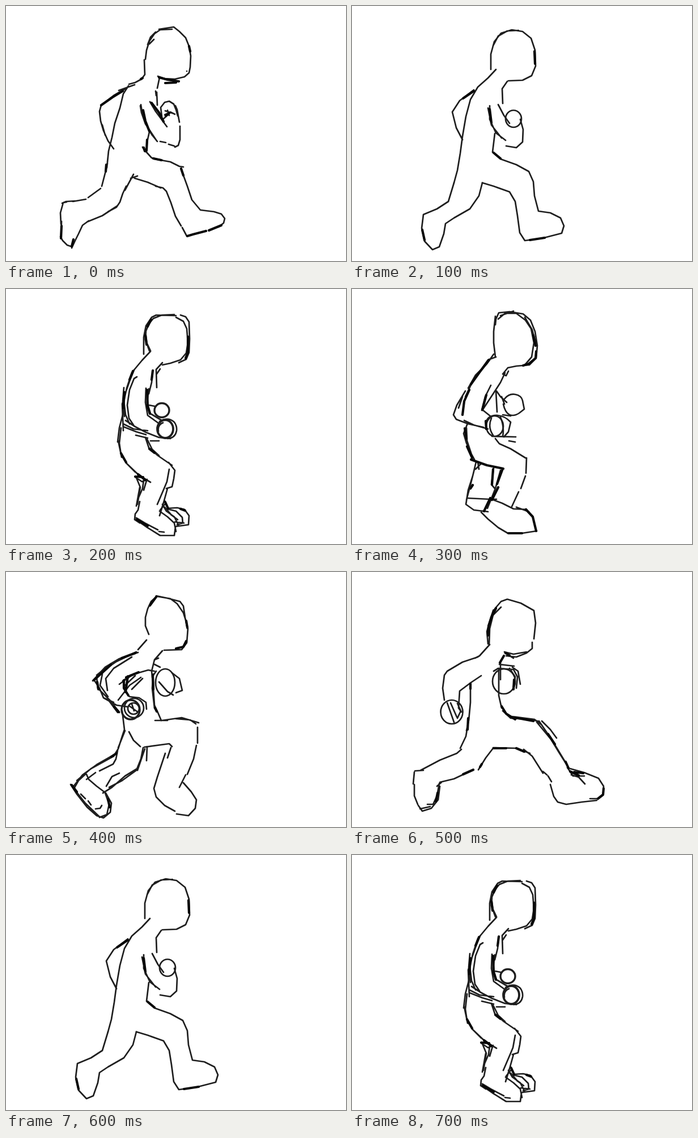
These frames come from a looping animation (600x450 px, 0.8 s). An HTML page:

```html
<!DOCTYPE html>
<html lang="en">
<head>
<meta charset="utf-8">
<title>Run cycle</title>
<style>
  html, body { margin: 0; width: 100%; height: 100%; overflow: hidden; background: #fff; }
  svg { display: block; width: 100%; height: 100%; }
  .pose {
    fill: none; stroke: #1e1e1e; stroke-width: 2.7;
    stroke-linecap: round; stroke-linejoin: round;
    filter: blur(0.6px);
    visibility: hidden;
    animation: once 800ms step-end infinite;
    animation-delay: calc((var(--i) - 8) * 100ms);
  }
  .both { animation-name: twice; }
  .bold { stroke: #080808; stroke-width: 4.2; }
  @keyframes once { 0% { visibility: visible; } 12.5%, 100% { visibility: hidden; } }
  /* poses shared by both steps return 500 ms later */
  @keyframes twice {
    0%, 62.5% { visibility: visible; }
    12.5%, 75%, 100% { visibility: hidden; }
  }
</style>
</head>
<body>
<svg viewBox="0 0 600 450">

  <!-- stride -->
  <g class="pose" style="--i:0">
    <path d="M244 95L245 121L239 129M246 94L248 78L253 62L262 49L272 42L293 41M250 68L255 55L264 46M253 67L261 59M270 41L296 37L306 45L317 56L323 71L326 88L325 108L323 118L315 125L298 129L280 128L268 124M319 115h.1M271 126L267 145M266 152L267 175M264 150L265 158"/>
    <path d="M241 128L228 135L217 138M227 139L199 149M214 144L190 158L168 175L165 186L167 203L172 220L180 238L190 252M170 210L175 228M216 141L207 155L201 180L192 207L187 232L181 256L178 285M179 278L176 291L169 318"/>
    <path d="M238 174L241 193L250 215L258 228L267 239M237 176L239 188L246 208L266 238M254 169L264 186L284 213M272 239L282 241M287 244L297 247M298 249L304 246L307 236L307 212M306 205L302 183L299 176M275 195L273 179L280 170L288 168L296 173L300 183L303 194M280 192L290 187L298 191M285 184L288 193M278 199L288 190M281 185L293 189"/>
    <path d="M253 222L249 240L248 258L257 268L276 272M241 249L246 257M262 270L290 275L306 283L313 284M312 296L320 318L328 342L343 360L367 363L380 367L386 375L384 383L375 390M319 406L311 391M309 388L299 371L291 347L283 327L277 321L264 318M273 321L250 311L227 304"/>
    <path d="M220 304L232 300M225 297L218 310L210 325M212 318L206 331L201 346L195 355L180 363M196 353L170 370L143 381M146 379L135 387L128 402L122 414L116 427M117 425L108 422L100 414L96 407M97 408L98 380M97 385L96 365L101 347L107 346M99 348L106 345L122 344M118 345L141 341M145 338L167 322"/>
    <path class="bold" d="M323 71L325 80M270 126L285 130L305 133M281 136L300 135M241 127L238 129M206 150L188 161L168 175M242 184L246 203L253 221M257 171L270 188L278 204M282 194L288 189M243 250L245 256M249 236L248 255M260 269L274 272M309 287L313 299M353 397L330 403L320 406M380 387L358 396M98 388L97 410M177 280L176 292M119 412L116 424"/>
  </g>

  <!-- down -->
  <g class="pose both" style="--i:1">
    <path d="M245 112L245 85L251 63L263 48L282 42L301 45L316 57L323 78L324 106L317 123L301 131L276 132M249 70L258 53L274 44L294 43M254 112L240 127L222 143M274 133L265 146L266 172M222 143L209 165L201 195L195 230L191 260L186 290L180 312M215 148L190 167L177 187L184 215L195 236"/>
    <path d="M243 176L243 200L254 224L271 237M240 180L246 210L264 233M258 174L268 193L278 207M272 247L290 250L301 240L302 218L297 200M252 225L248 258L262 270L290 280L312 292L320 310L322 335L329 362L350 365L368 374L374 388L370 401L335 410L305 414L296 400L292 370L288 345L278 328L250 318L230 312"/>
    <path d="M230 312L224 335L208 358L180 374L165 384L162 402L154 425L142 430L128 415L123 392L126 368L150 358L170 345L180 312"/>
    <ellipse cx="285" cy="199" rx="14" ry="15"/>
    <path class="bold" d="M322 80L323 102M215 150L196 163M243 182L246 206M250 259L262 269M340 409L314 413M124 395L128 413"/>
  </g>

  <!-- passing -->
  <g class="pose both" style="--i:2">
    <path d="M243 115L243 85L247 65L257 50L265 46L300 47M253 60L247 74L246 90L255 109M250 64L260 52L275 46L297 45M308 46L317 49L323 58L324 88L323 112L318 124L305 130M300 50L313 57L319 70L321 95L318 113L308 125L290 131L276 134M246 75L249 98L253 109M255 110L240 126L225 144M276 130L265 142L266 174M272 141L266 150M259 143L257 165L252 185"/>
    <path d="M226 143L219 160L212 180L205 203L207 250M222 148L213 175L208 198L211 222L218 238M231 155L226 158L218 178L214 205L217 228L225 240M208 174L206 198L209 225M247 175L246 200L250 223L268 236M252 176L249 200L255 220L275 232M253 205L263 207M207 238L225 247L250 250M211 232L228 243L247 253L270 262L290 264M229 258L250 263M207 243L230 252L247 257M255 268L270 268"/>
    <ellipse cx="275" cy="214" rx="13" ry="12.5" stroke-width="3.4"/>
    <ellipse cx="281" cy="247" rx="14" ry="16" stroke-width="3.8"/>
    <path d="M271 234Q286 225 297 235Q302 242 301 250Q299 263 285 264M269 251Q267 240 277 236"/>
    <path d="M206 222L200 245L197 270M203 245L200 272L203 292L213 308L228 323M198 268L204 297M213 308L235 329L255 341M246 262L252 280L268 294L284 305L293 311M249 265L258 283L270 294M287 306L298 320L296 335L293 349L283 352M285 352L278 377L271 400M288 318L284 340L279 352L273 366L267 380"/>
    <path d="M228 332L240 340L249 336M230 333L237 350L234 367M243 337L241 352L234 368L232 380M248 338L243 355M236 350L232 372L230 383M236 375L233 390L228 397L227 407L236 413M229 407L248 420L272 435L297 435L299 420M230 404L245 413L268 425M270 428L279 429M271 392L285 402L297 413L300 428"/>
    <path d="M280 374L286 387L302 386L315 389L323 400L322 416L300 419M276 380L283 392L297 402L305 418M284 388L300 392L311 403L312 413L302 416M280 385L292 399L303 407M298 411L314 413M281 379L272 390"/>
    <path class="bold" d="M256 54L250 66M246 82L248 98M321 84L321 112L317 122M259 144L257 160M224 145L218 160M209 182L207 210M249 178L250 208L254 220M231 407L250 418M228 331L242 332M203 290L212 306M233 327L246 337M253 282L262 289M281 376L286 387M308 388L316 391"/>
  </g>

  <!-- lift -->
  <g class="pose" style="--i:3">
    <path d="M253 63L254 53L259 42L278 40L302 44L315 55L323 75L327 100L325 122L313 134L290 136L275 139M253 48L250 75L250 95L253 120M258 53L270 43L290 43L306 55L316 70L321 95L317 120L305 134M262 47L285 39M305 50L318 72L324 95M254 120L240 125L225 146L212 165L200 190M250 115L238 132L218 152L205 175M275 139L266 150L272 153L276 145M270 148L262 165L251 182L230 214M245 170L235 190L229 214"/>
    <path d="M200 180L185 205L179 222L184 230L205 238L232 244M195 190L188 210M198 232L215 240L240 247M254 180L256 217M255 180L262 190L273 200M264 190L269 203M230 213L245 225M266 222L280 224"/>
    <path d="M269 194Q277 184 288 186Q299 188 301 197L304 212L295 219Q286 225 278 222Q270 218 267 203"/>
    <ellipse cx="252" cy="242" rx="15" ry="18"/>
    <path d="M236 236Q240 222 257 223Q270 224 280 235L276 252L268 261M246 228Q239 244 249 258M262 226Q269 243 266 260"/>
    <path d="M247 260L289 261M277 268L288 270M253 264L260 273L280 282L306 298M204 237L197 255L202 272L210 290L216 301M202 245L203 268L212 295M308 298L307 325M306 330L298 352M294 358L282 384M262 320L253 352L239 387M250 316L246 345L252 352M219 305L213 330L205 355L201 380L215 390L240 393M228 308L218 318M222 305L224 318M216 318L208 350L202 372"/>
    <path d="M203 369L243 371L255 371M249 372L265 378L285 388L308 389M228 394L240 406L258 421L275 431L300 431L326 427M290 385L312 393"/>
    <path class="bold" d="M320 82L324 100M325 110L324 122L312 132L302 135M242 125L225 147L210 168M207 178L198 198L195 222M237 187L230 213M236 233L237 247M199 246L202 264M203 278L212 298M210 301L238 311L267 317M266 317L256 344M249 318L247 345M258 350L247 372M244 369L233 392M213 346L209 352M307 389L319 402L325 427M276 431L300 431"/>
  </g>

  <!-- reach -->
  <g class="pose" style="--i:4">
    <path d="M252 110L246 95L246 80L250 65L256 52L266 43L290 47L302 56L313 72L318 88L321 100L319 125L310 137L279 138M265 42L284 46L307 52L313 60L316 80L320 100M248 120L233 137M276 139L262 155L257 175L260 205L262 235L268 248L274 262M262 155L269 152M260 180L258 205L262 240M233 142L200 153L175 168L153 192M230 141L195 158L170 175L157 188"/>
    <path d="M222 150L190 170L176 188L179 209M215 148L185 162L160 182M155 190L165 205L172 222L190 230M160 185L162 205L185 228L200 248M170 180L166 200L180 220M172 222L195 235L215 238M180 225L197 248M206 192L220 182L237 177L251 173L262 175M200 198L225 180M238 186L218 200L198 226M228 183L210 200M241 188L222 207"/>
    <ellipse cx="220" cy="243" rx="16" ry="17" stroke-width="3.4"/>
    <circle cx="226" cy="240" r="17"/>
    <circle cx="225" cy="241" r="10"/>
    <path d="M218 220L235 222L247 230L248 242M217 236L231 246M222 233L226 245"/>
    <ellipse cx="281" cy="195" rx="17" ry="24"/>
    <path d="M293 178L306 188L311 209L300 213M270 194L285 211L295 217M265 175L258 185M262 163L272 168"/>
    <path d="M205 245L209 278L205 290L198 312L190 325M217 282L225 297L237 308M210 280L198 310M263 262L285 262M275 262L310 257L340 266M300 259L325 261L335 268M338 274L338 302M336 306L331 330L320 357M317 358L306 380M313 372L327 388L336 402L334 417L322 430L301 427M298 422L280 412L265 397L261 382L267 362L281 320M291 310L285 328M244 309L288 303L293 308"/>
    <path d="M249 308L248 333M242 310L238 330L230 350L205 368L182 380M245 312L232 350M233 346L210 360L187 380L171 390M197 315L194 330L189 339L165 351M195 320L160 340L135 358L120 377M190 325L150 347L125 368M158 354L142 366M200 355L187 361L177 378"/>
    <path d="M114 375L125 392L143 415L160 430L172 434L184 424L186 408L176 390L160 378L146 366L142 357M118 380L140 408L165 432M140 357L128 368L120 382M175 390L182 410L178 428L165 433M132 392L140 400M145 404L150 411M158 418L166 417L169 412"/>
    <path class="bold" d="M265 44L254 59M318 86L320 98M300 135L313 132L318 122M228 143L204 152M185 164L155 191M208 191L208 205L216 218M215 184L211 212M234 177L212 186M259 182L260 207M263 240L266 246M161 194L163 207M191 238L199 247M195 320L186 326M116 376L125 388M180 401L183 415"/>
  </g>

  <!-- opposite stride -->
  <g class="pose" style="--i:5">
    <path d="M240 127L238 105L245 80L252 65L263 52L274 48L298 55L321 68L324 90L321 118M263 62L249 76L243 100L242 129M318 124L318 135L308 143L290 150L272 148M269 141L285 145L308 141M270 143L285 152M243 128L225 148L217 152M222 150L195 159L168 175L163 182L160 205L163 226M228 183L210 195L190 210L188 240L193 247"/>
    <ellipse cx="176" cy="247" rx="19.5" ry="21"/>
    <path d="M168 231L180 265M174 231L185 256M186 232L192 245L186 258M260 163L286 166M262 158L262 190"/>
    <ellipse cx="268" cy="193" rx="20" ry="22"/>
    <path d="M283 168L293 175L297 198M250 175L258 170L285 172L292 185L290 205M278 170L288 185L284 207M259 170L259 218L264 240M266 245L280 258L310 260L328 263M283 255L322 260L335 270M330 263L345 285L365 318L382 345M335 263L350 278L361 293M326 265L355 300L378 338"/>
    <path d="M380 345L390 360L410 360M385 347L410 354L435 364L444 378L443 392L434 400L420 400M387 358L400 362L411 374M432 403L405 406L378 410L363 406L356 396L350 375M352 370L346 360M344 358L337 352M337 355L318 325L303 313M249 310L290 311L314 320M249 311L236 328L223 349"/>
    <path d="M214 349L180 365L155 371M158 371L150 378M154 373L150 395L143 410L133 410M155 378L152 402L140 417L124 422L117 412M138 414L120 418M116 410L110 395L110 375M108 374L110 353M111 351L126 350M121 350L155 332L185 320L193 313M191 311L201 290L203 278M202 280L206 262L209 230L209 197"/>
    <path class="bold" d="M250 68L241 95L240 112M254 64L248 76M268 148L261 160M271 143L278 147M264 237L272 250L288 260M288 257L320 263M346 286L358 304M377 335L382 346M385 352L400 359M392 353L408 355M434 400L443 393L444 382M286 190L285 207M209 197L209 206M205 258L204 278M214 349L196 357M250 311L272 311M290 311L304 317M151 390L148 405M226 344L229 339"/>
  </g>
</svg>
</body>
</html>
```
